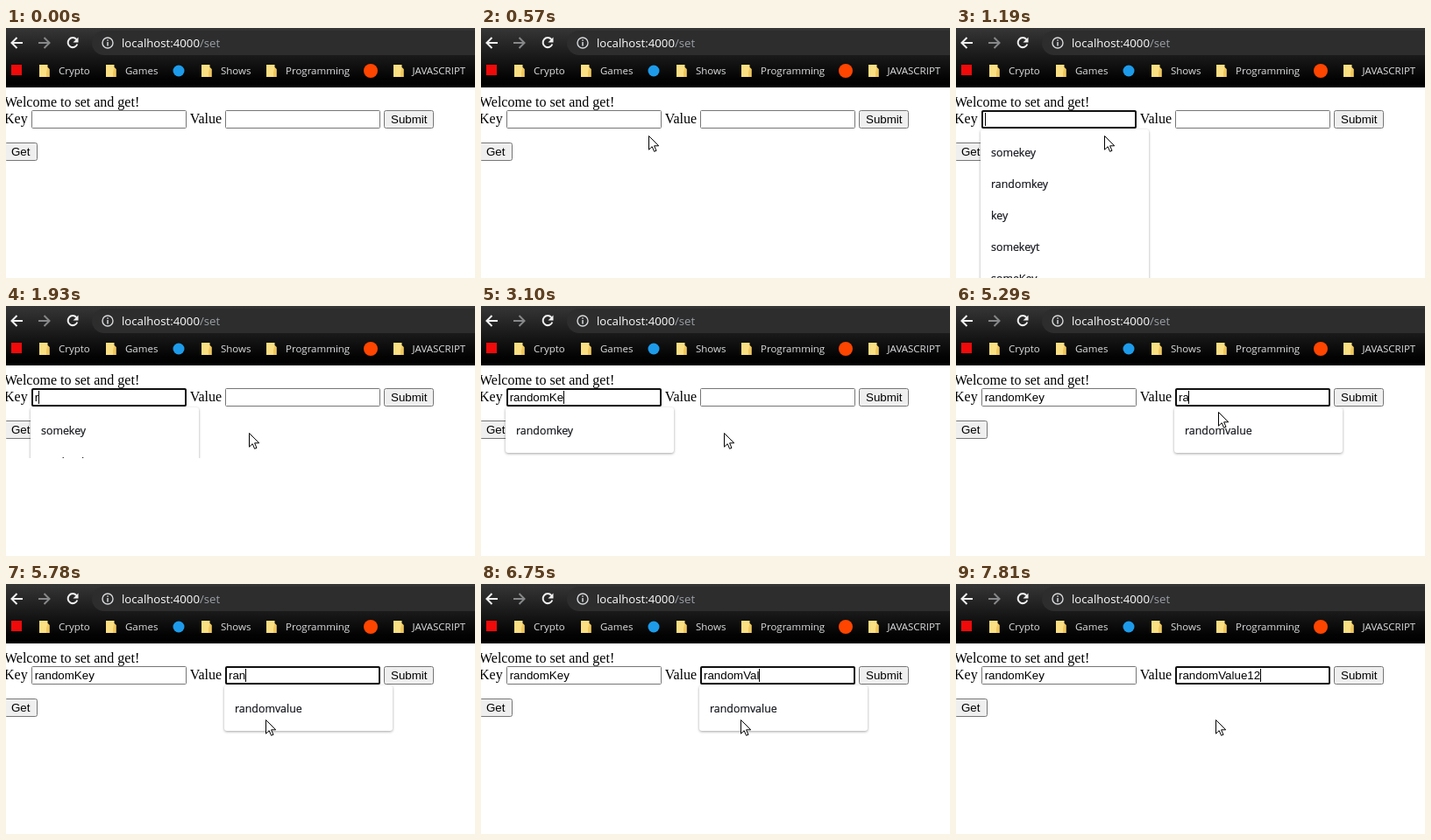
An HTML page for the animation above (8 s loop, 535 px wide and 286 px high).

```html
<!DOCTYPE html>
<html lang="en">
<head>
<meta charset="utf-8">
<title>Set and get</title>
<style>
  html, body { margin: 0; width: 100%; height: 100%; overflow: hidden; background: #fff; }
  svg { display: block; }
  text { white-space: pre; }
  .ui { font-family: "Open Sans", "Noto Sans", sans-serif; }
  .marks { font-size: 11.5px; fill: #dfe0e2; }
  .url { font-size: 13.2px; fill: #fff; }
  .page { font: 16px "Liberation Serif", "Times New Roman", serif; }
  .ctl { font: 13.333px "Liberation Sans", Arial, sans-serif; }
  .btn { fill: #efefef; stroke: #767676; }
  .field { fill: #fff; stroke: #767676; }
  .field.hover { stroke: #4f4f4f; }
  .ring { fill: none; stroke: #101010; stroke-width: 2; }
  .list { font-size: 12.4px; font-weight: 500; fill: #14161c; }
  .list text { stroke: #14161c; stroke-width: .2px; }
  .panel { fill: #fff; filter: drop-shadow(0 1px 1.5px rgba(0, 0, 0, .36)); }
  .row { fill: #e8e8e9; }
</style>
</head>
<body>
<svg width="535" height="286" viewBox="0 0 535 286">
  <defs>
    <linearGradient id="bar" x2="0" y2="1">
      <stop offset="0" stop-color="#363636"/>
      <stop offset=".5" stop-color="#181818"/>
      <stop offset=".85" stop-color="#030303"/>
      <stop offset="1" stop-color="#000"/>
    </linearGradient>
    <g id="folder">
      <path d="M0 0H9.500V3L11.500 5V14H0Z" fill="#fbdf83"/>
      <path d="M9.500 3L11.500 5V14H8V9Z" fill="#f0c75c"/>
    </g>
    <clipPath id="cut"><rect id="cutBox" x="0" y="112" width="535" height="174"/></clipPath>
  </defs>

  <rect width="535" height="286" fill="#fff"/>
  <rect width="535" height="68" fill="url(#bar)"/>
  <rect x="98" y="3" width="470" height="28" rx="14" fill="#2d2d2e"/>
  <g fill="none" stroke="#f1f1f1" stroke-width="2">
    <path d="M19 17H6.500M12.500 11L6.500 17L12.500 23"/>
    <path d="M37 17H49.500M43.500 11L49.500 17L43.500 23" stroke="#87888a"/>
    <path d="M80.300 13A5.500 5.500 0 1 0 81.300 18.500"/>
    <path d="M82.500 10.500V16.500H76.500Z" fill="#f1f1f1" stroke="none"/>
    <circle cx="116" cy="17" r="6" stroke="#d8d9db" stroke-width="1.400"/>
    <path d="M116 16V20.500M116 13.200V14.700" stroke="#d8d9db" stroke-width="1.500"/>
  </g>
  <text class="ui url" x="132" y="22">localhost:4000<tspan fill="#9aa0a6">/set</tspan></text>

  <rect x="6" y="42" width="12" height="12" fill="#f00a0a"/>
  <circle cx="197" cy="49" r="6.500" fill="#1d9bea"/>
  <circle cx="416" cy="49" r="8" fill="#ff4500"/>
  <g class="ui marks">
    <use href="#folder" x="38" y="42"/><text x="60" y="53">Crypto</text>
    <use href="#folder" x="114" y="42"/><text x="136" y="53">Games</text>
    <use href="#folder" x="223" y="42"/><text x="245" y="53">Shows</text>
    <use href="#folder" x="297" y="42"/><text x="319" y="53">Programming</text>
    <use href="#folder" x="442" y="42"/><text x="463.500" y="53">JAVASCRIPT</text>
  </g>

  <g class="page">
    <text x="-2" y="90">Welcome to set and get!</text>
    <text x="-2" y="109">Key</text>
    <text x="209.660" y="109">Value</text>
  </g>
  <rect class="btn" x="431.500" y="94.500" width="56" height="20" rx="2"/>
  <rect class="btn" x="-1.500" y="131.500" width="37" height="20" rx="2"/>
  <g class="ctl">
    <text x="439" y="109">Submit</text>
    <text x="6" y="146">Get</text>
    <rect class="field" id="keyBox" x="29.500" y="94.500" width="176" height="20" rx="1"/>
    <rect class="field" id="valueBox" x="250.500" y="94.500" width="176" height="20" rx="1"/>
    <rect class="ring" id="ring" y="95" width="175" height="19" rx="1.500"/>
    <text id="keyText" x="32.660" y="109"></text>
    <text id="valueText" x="254" y="109"></text>
    <rect id="caret" y="97" width="1" height="15"/>
  </g>

  <g id="keyList" class="ui list" clip-path="url(#cut)">
    <rect id="keyPanel" class="panel" x="28" y="116" width="192" rx="3"/>
    <rect id="keyRow" class="row" x="28" y="124" width="192" height="36"/>
    <text id="first" x="40" y="147"></text>
    <g id="rest">
      <text x="40" y="183">randomkey</text>
      <text x="40" y="219">key</text>
      <text x="40" y="255">somekeyt</text>
      <text x="40" y="291">someKey</text>
    </g>
  </g>
  <g id="valueList" class="ui list">
    <rect class="panel" x="249" y="116" width="192" height="52" rx="3"/>
    <rect id="valueRow" class="row" x="249" y="124" width="192" height="36"/>
    <text x="261" y="147">randomvalue</text>
  </g>

  <path id="arrow" d="M.5 .5V16.200L4.200 12.700L6.600 18.300L9 17.300L6.600 11.800H11.700Z" fill="#fff" stroke="#000"/>
  <path id="beam" d="M-3 -7.500H0M1 -7.500H4M.5 -7V7M-3 7.500H0M1 7.500H4" fill="none" stroke="#000"/>
</svg>
<script>
  const LOOP = 8000, BLINK = 510;
  const FOCUS_KEY = 650, OPEN_KEY = 860, FOCUS_VALUE = 4160, CLOSE_VALUE = 7710;
  const keyTimes = [1930, 2130, 2230, 2320, 2420, 2630, 2940, 3100, 3360];
  const valueTimes = [4960, 5190, 5780, 5880, 6030, 6230, 6540, 6640, 6750, 6990, 7020, 7710, 7810];
  const resets = [FOCUS_KEY, 1140, ...keyTimes, FOCUS_VALUE, ...valueTimes];

  // time, x, y of the pointer
  const path = [
    [270, 417, 288], [400, 330, 222], [540, 205, 130], [660, 150, 104],
    [860, 150, 104], [1000, 154, 100], [1130, 160, 106], [1190, 168, 123],
    [1240, 222, 136], [1290, 276, 144], [1650, 276, 144], [1770, 277, 145],
    [3740, 277, 145], [3900, 296, 130], [4020, 305, 112], [4110, 306, 98],
    [4240, 305, 105], [5200, 305, 105], [5290, 299, 120], [5340, 296, 155]
  ];

  const el = {};
  document.querySelectorAll("[id]").forEach(e => el[e.id] = e);
  const show = (e, on) => e.style.display = on ? "" : "none";
  const ramp = (t, a, b) => Math.min(1, Math.max(0, (t - a) / (b - a)));
  const typed = (word, times, t) => word.slice(0, times.filter(k => k <= t).length);
  const setText = (e, s) => { if (e.textContent !== s) e.textContent = s; };

  function pointerAt(t) {
    const i = path.findIndex(p => p[0] > t);
    if (i === 0) return [417, 300];
    if (i < 0) return path[path.length - 1].slice(1);
    const [a, x, y] = path[i - 1], [b, u, v] = path[i], k = ramp(t, a, b);
    return [x + (u - x) * k, y + (v - y) * k];
  }

  function drawPointer(x, y) {
    const inRow = y > 94 && y < 116;
    const overKey = inRow && x > 29 && x < 206, overValue = inRow && x > 250 && x < 427;
    const at = `translate(${Math.round(x)} ${Math.round(y)})`;
    el.keyBox.classList.toggle("hover", overKey);
    el.valueBox.classList.toggle("hover", overValue);
    show(el.beam, overKey || overValue);
    show(el.arrow, !overKey && !overValue);
    el.beam.setAttribute("transform", at);
    el.arrow.setAttribute("transform", at);
  }

  function drawKeyList(t, x, y) {
    const filtered = t >= 1970;
    show(el.keyList, t >= OPEN_KEY && t < FOCUS_VALUE);
    el.keyList.style.opacity = ramp(t, OPEN_KEY - 30, OPEN_KEY + 110);
    el.keyPanel.setAttribute("height", filtered ? 52 : 200);
    el.cutBox.setAttribute("height", t >= 1930 && !filtered ? 62 : 174);
    setText(el.first, filtered ? "randomkey" : "somekey");
    show(el.rest, !filtered);
    show(el.keyRow, x < 220 && y >= 124 && y < 160);
  }

  function drawFields(t) {
    const inValue = t >= FOCUS_VALUE, hover = t >= 5320 && t < 5780;
    setText(el.keyText, typed("randomKey", keyTimes, t));
    setText(el.valueText, hover ? "randomvalue" : typed("randomValue12", valueTimes, t));
    el.valueBox.style.fill = hover ? "#e8f0fe" : "";
    show(el.valueRow, hover);
    show(el.valueList, inValue && t < CLOSE_VALUE);
    el.valueList.style.opacity = ramp(t, FOCUS_VALUE - 20, FOCUS_VALUE + 80);

    show(el.ring, t >= FOCUS_KEY);
    el.ring.setAttribute("x", inValue ? 251 : 30);
    const last = Math.max(...resets.filter(r => r <= t));
    show(el.caret, t >= FOCUS_KEY && !hover && Math.floor((t - last) / BLINK) % 2 === 0);
    const width = (inValue ? el.valueText : el.keyText).getComputedTextLength();
    el.caret.setAttribute("x", Math.floor((inValue ? 254 : 33) + width));
  }

  function draw(t) {
    const [x, y] = pointerAt(t);
    drawPointer(x, y);
    drawKeyList(t, x, y);
    drawFields(t);
  }

  const start = performance.now();
  function tick() {
    draw((performance.now() - start) % LOOP);
    requestAnimationFrame(tick);
  }
  tick();
</script>
</body>
</html>
```
